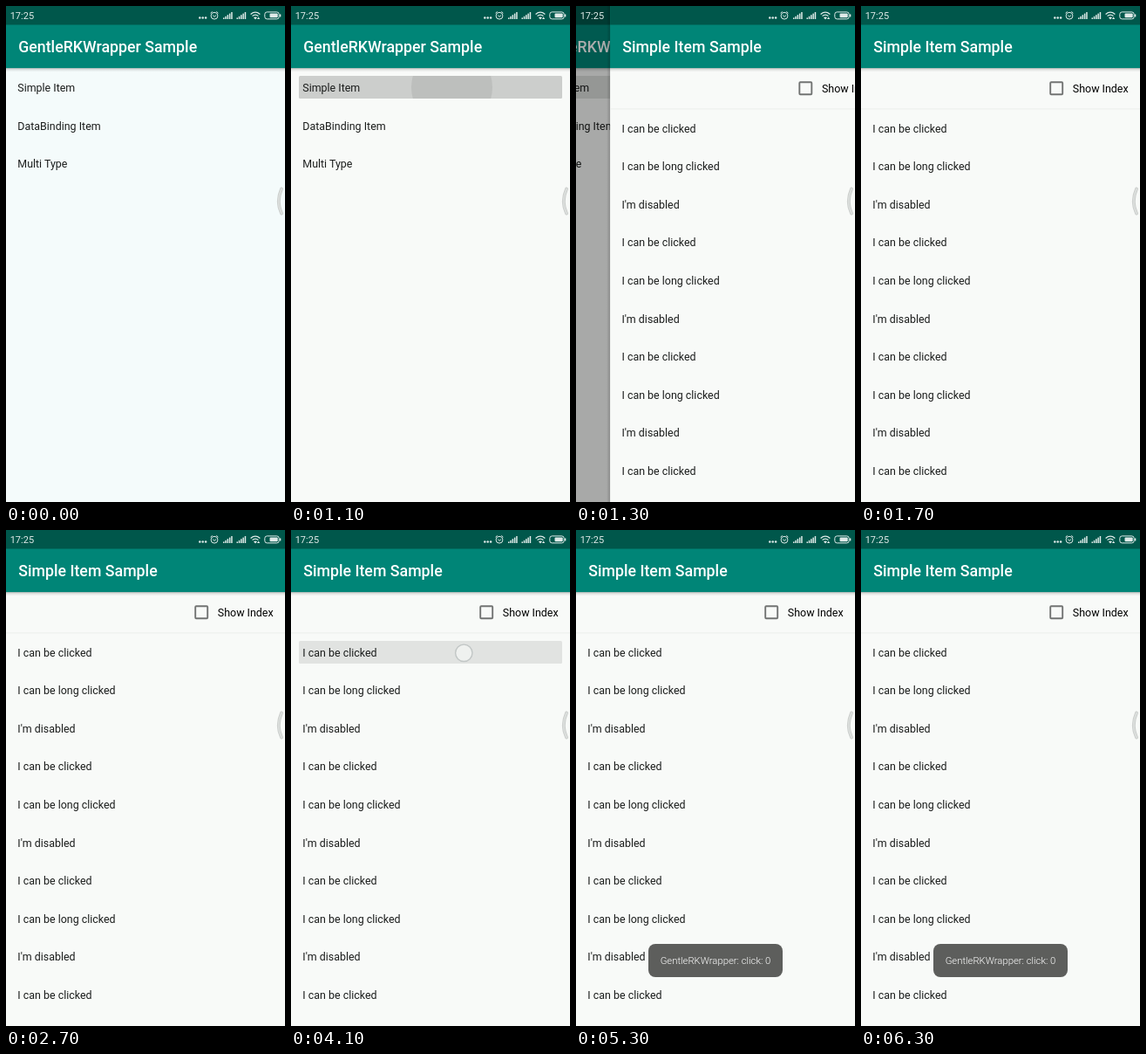
These frames come from a looping animation (320x568 px, 8000 ms). An HTML page:

```html
<!DOCTYPE html>
<html lang="en">
<head>
<meta charset="utf-8">
<title>List sample</title>
<style>
  html, body { margin: 0; width: 100%; height: 100%; overflow: hidden; background: #f8faf8; }
  svg { display: block; width: 100%; height: 100%; }
  text { font-family: Roboto, "Noto Sans", sans-serif; white-space: pre; }
  .item { font-size: 12.44px; fill: #1b1d1c; }
  .title { font-size: 17.78px; font-weight: 500; fill: #fff; }
</style>
</head>
<body>
<svg viewBox="0 0 320 568">
  <defs>
    <linearGradient id="drop" x2="0" y2="1">
      <stop offset="0" stop-opacity=".26"/>
      <stop offset=".4" stop-opacity=".09"/>
      <stop offset="1" stop-opacity="0"/>
    </linearGradient>
    <linearGradient id="side">
      <stop offset="0" stop-opacity="0"/>
      <stop offset="1" stop-opacity=".18"/>
    </linearGradient>
  </defs>
  <g id="home"></g>
  <rect id="dim" width="320" height="568" opacity="0"/>
  <g id="detail"></g>

  <g id="toast">
    <rect x="83" y="474" width="154" height="38" rx="8" fill="#5d5e5c"/>
    <text x="160" y="497.2" text-anchor="middle" font-size="11.3" font-weight="300" fill="#fff">GentleRKWrapper: click: 0</text>
  </g>

  <g id="status" fill="#dfeae8" stroke="none">
    <text x="4.7" y="15" font-size="11">17:25</text>
    <g id="dots"></g>
    <g fill="none" stroke="#dfeae8" stroke-width="1">
      <circle cx="239" cy="11.2" r="3.9"/>
      <path d="M237.2 10.6L239 12.4L241 10.6M234.6 8.2L236.6 6.4M243.4 8.2L241.4 6.4"/>
      <path d="M280.6 9.4Q286 4.8 291.4 9.4M282.6 11.6Q286 8.8 289.4 11.6" stroke-width="1.3"/>
      <rect x="296.8" y="6.9" width="16.4" height="8" rx="2.6"/>
    </g>
    <path d="M284 13.2Q286 11.8 288 13.2L286 15.6Z"/>
    <path d="M289.6 12.4L291.2 15H288Z"/>
    <rect x="302.5" y="8.6" width="9.2" height="4.6" rx="1"/>
    <rect x="314" y="9.2" width="1.3" height="3.4" rx=".6"/>
    <g id="bars"></g>
  </g>

  <g fill="none" stroke-linecap="round">
    <path d="M316 209.5Q309.6 224 316 237.5" stroke="#c6c9c7" stroke-width="3.8"/>
    <path d="M316 209.5Q309.6 224 316 237.5" stroke="#dadddb" stroke-width="2.4"/>
  </g>
</svg>
<script>
const LOOP = 8000, STEP = 100;
const $ = id => document.getElementById(id);
const set = (el, attrs) => { for (const k in attrs) el.setAttribute(k, attrs[k]); };

const item = (label, mid, x = 13.3) =>
  `<text class="item" x="${x}" y="${mid + 4.4}">${label}</text>`;

// Row highlight, growing ripple and touch spot
const touch = (id, y) => `
  <clipPath id="${id}Clip"><rect x="9" y="${y}" width="302" height="26" rx="1.5"/></clipPath>
  <g clip-path="url(#${id}Clip)">
    <rect id="${id}Row" x="9" y="${y}" width="302" height="26"/>
    <circle id="${id}Wave" cy="${y + 13}"/>
  </g>`;
const spot = (id, x, y) =>
  `<circle id="${id}Spot" cx="${x}" cy="${y}" r="9.7" fill="#f1f3f1" stroke="#bfc4c3" stroke-width="1.4"/>`;

const page = (id, title, body) => `
  <rect id="${id}Bg" y="71" width="320" height="497" fill="#f8faf8"/>
  <rect width="320" height="71.1" fill="#008577"/>
  <rect width="320" height="21.5" fill="#00574b"/>
  <rect y="71.1" width="320" height="4.5" fill="url(#drop)"/>
  <text class="title" x="14.2" y="53.2">${title}</text>${body}`;

$('home').innerHTML = page('home', 'GentleRKWrapper Sample',
  touch('open', 80) +
  ['Simple Item', 'DataBinding Item', 'Multi Type'].map((s, i) => item(s, 93.6 + i * 43.55)).join('') +
  spot('open', 190, 93));

const labels = ['I can be clicked', 'I can be long clicked', "I'm disabled"];
let rows = '';
for (let i = 0; i < 10; i++) rows += item(labels[i % 3], 140.4 + i * 43.55);

$('detail').innerHTML = '<rect id="edge" x="-4" width="4" height="568" fill="url(#side)"/>' +
  page('detail', 'Simple Item Sample', `
  <rect x="217.2" y="87.2" width="14" height="14" rx="1" fill="none" stroke="#727473" stroke-width="1.9"/>
  <text class="item" x="242.8" y="98.9" style="fill:#000">Show Index</text>
  <rect y="117.4" width="320" height="1" fill="#eceeec"/>` +
  touch('click', 127) + rows + spot('click', 198.3, 140.8));

$('dots').innerHTML = [222.3, 225.7, 229.1].map(x => `<circle cx="${x}" cy="13.4" r="1.25"/>`).join('');
let bars = '';
for (const x of [249, 264.5])
  for (let i = 0; i < 5; i++)
    bars += `<rect x="${x + i * 2.3}" y="${13.4 - i * 1.6}" width="1.5" height="${1.6 + i * 1.6}"/>`;
$('bars').innerHTML = bars;

// Linear interpolation through [time, value] pairs
function track(t, keys) {
  if (t <= keys[0][0]) return keys[0][1];
  for (let i = 1; i < keys.length; i++) {
    const [a, u] = keys[i - 1], [b, v] = keys[i];
    if (t <= b) return u + (v - u) * (t - a) / (b - a);
  }
  return keys[keys.length - 1][1];
}

function press(id, row, wave, r, cx, spotOn) {
  set($(id + 'Row'), { opacity: row });
  set($(id + 'Wave'), { opacity: wave, r, cx });
  set($(id + 'Spot'), { opacity: spotOn });
}

function draw(t) {
  set($('homeBg'), { fill: t < 800 ? '#f4fbfb' : '#f8faf8' });

  press('open',
    track(t, [[700, 0], [1000, .177], [1100, .177], [1300, .11], [1500, 0]]),
    track(t, [[800, 0], [900, .075], [1100, .075], [1300, 0]]),
    track(t, [[800, 0], [1000, 24], [1100, 46.5], [1300, 150]]),
    track(t, [[800, 190], [1100, 184.5], [1300, 160]]),
    track(t, [[700, 0], [800, .9], [1000, .9], [1100, 0]]));

  // Cubic ease-out slide
  const left = t <= 1100 ? 1 : Math.max(0, (1500 - t) / 403) ** 3;
  const gone = 1 - left;
  set($('home'), { transform: `translate(${-73 * gone})`, visibility: gone < 1 ? 'visible' : 'hidden' });
  set($('dim'), { opacity: .37 * gone });
  set($('detail'), { transform: `translate(${320 * left})`, visibility: gone > 0 ? 'visible' : 'hidden' });

  press('click',
    track(t, [[3800, 0], [4100, .096], [4300, .11], [4800, .11], [5100, 0]]),
    track(t, [[4100, 0], [4300, .055], [4800, .055], [5100, 0]]),
    track(t, [[4100, 5], [4600, 42], [4800, 77], [5100, 152]]),
    track(t, [[4100, 198], [4800, 187], [5100, 160]]),
    track(t, [[3800, 0], [3900, .92], [4600, .92], [4700, 0]]));

  set($('toast'), { opacity: track(t, [[4900, 0], [5300, 1]]) });
}

function frame(now) {
  draw(Math.floor(now % LOOP / STEP) * STEP);
  requestAnimationFrame(frame);
}
draw(0);
requestAnimationFrame(frame);
</script>
</body>
</html>
```
